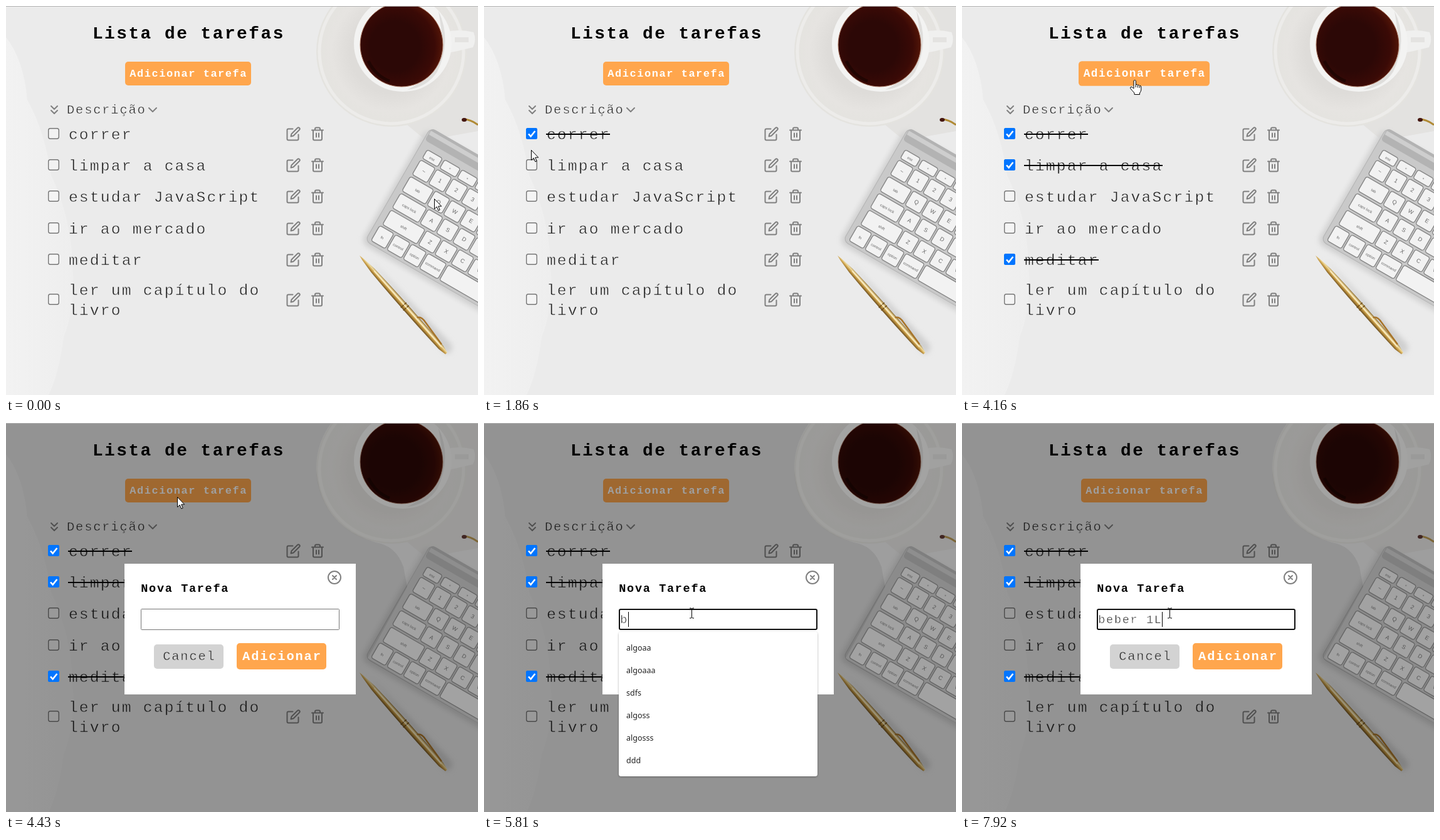
Recreate the animation shown at these times as an HTML page. Size 753x622 px, loop 8000 ms.

```html
<!DOCTYPE html>
<html lang="pt-BR">
<head>
<meta charset="utf-8">
<title>Lista de tarefas</title>
<style>
html, body { margin: 0; width: 100%; height: 100%; overflow: hidden; background: #ebebeb; }
svg { display: block; }
text { font-family: "Courier New", "Liberation Mono", monospace; letter-spacing: .09em; fill: #000; }
.bold { font-weight: 700; }
.title { font-size: 27.8px; }
.item { font-size: 24.6px; }
.mid { font-size: 20.4px; }
.field { font-size: 18.55px; }
.button { font-size: 17px; }
.white { fill: #fff; }
/* an outline in the paper colour makes the strokes finer */
.thin { fill: #1c1c1c; stroke: #ebebeb; stroke-width: .55; }
.icon { fill: none; stroke: #808080; stroke-width: 2; stroke-linecap: round; stroke-linejoin: round; }
.key { fill: #f2f2f2; stroke: #868686; stroke-width: 1.4; }
.label { font: 9px "Liberation Sans", sans-serif; letter-spacing: 0; fill: #666; text-anchor: middle; }
.small { font-size: 6px; }
.hint { font: 12.5px "Noto Sans", sans-serif; letter-spacing: 0; fill: #222; }
.arrow { fill: #fff; stroke: #000; stroke-width: 1; stroke-linejoin: round; }
</style>
</head>
<body>
<svg width="753" height="622" viewBox="0 0 753 622">
  <defs>
    <linearGradient id="table" x2="1"><stop offset="0" stop-color="#f2f2f2"/><stop offset="1" stop-color="#eeeeee"/></linearGradient>
    <radialGradient id="saucer"><stop offset=".55" stop-color="#dedcd9"/><stop offset=".8" stop-color="#e6e4e1"/><stop offset="1" stop-color="#e4e3df"/></radialGradient>
    <radialGradient id="coffee" cx=".42" cy=".52" r=".6"><stop offset=".5" stop-color="#2c0806"/><stop offset=".8" stop-color="#3a0a06"/><stop offset="1" stop-color="#571708"/></radialGradient>
    <linearGradient id="gold" x2="0" y2="1"><stop offset="0" stop-color="#86642a"/><stop offset=".3" stop-color="#f3e0a4"/><stop offset=".6" stop-color="#c79b45"/><stop offset="1" stop-color="#65481a"/></linearGradient>
    <filter id="soft" x="-20%" y="-20%" width="140%" height="140%"><feGaussianBlur stdDeviation="4"/></filter>
    <filter id="drop" x="-10%" y="-10%" width="120%" height="120%"><feDropShadow dx="0" dy="1" stdDeviation="1.5" flood-opacity=".35"/></filter>
  </defs>

  <g id="photo">
    <rect width="753" height="622" fill="#ebebeb"/>
    <path d="M0 50Q28 85 34 150Q62 200 72 270Q104 340 106 410Q112 480 92 530Q84 590 68 622H0Z" fill="url(#table)"/>
    <path d="M690 0H753V200L670 215L640 190Z" fill="#e3e2e0"/>
    <circle cx="615" cy="73" r="120" fill="url(#saucer)"/>
    <circle cx="615" cy="73" r="115" fill="none" stroke="#edecea" stroke-width="5"/>
    <path d="M700 42Q722 36 746 42Q751 54 745 66Q722 72 700 76Z" fill="#f0f0ef"/>
    <path d="M716 50H738V58H716Z" fill="#e4e3e1"/>
    <ellipse cx="633" cy="60" rx="78" ry="77" fill="#f3f3f2"/>
    <path d="M690 8Q712 55 688 105Q672 130 640 134Q690 110 698 60Z" fill="#dfdedc"/>
    <ellipse cx="631" cy="62" rx="66" ry="67" fill="url(#coffee)" stroke="#a87560" stroke-width="1"/>
    <path d="M578 88Q590 112 612 120" fill="none" stroke="#170403" stroke-width="5" opacity=".6"/>
    <path d="M729 181Q741 181 753 190" fill="none" stroke="#b08a35" stroke-width="3"/>
    <ellipse cx="731" cy="182" rx="4" ry="3" fill="#431510"/>
    <g id="keyboard" transform="translate(680 196) rotate(30)"></g>
    <path d="M580 405L710 540Q716 552 702 557Z" fill="#cfcfcf" filter="url(#soft)"/>
    <g transform="translate(564 399) rotate(48.5)">
      <path d="M0 0L8 -1.5L32 -4Q105 -6.5 196 -4.5L209 -2V2L196 4.5Q105 6.5 32 4L8 1.5Z" fill="url(#gold)"/>
      <path d="M106 -6V6M112 -6V6" stroke="#6f4f1a" stroke-width="1.5"/>
      <path d="M135 -3Q138 -10 150 -8L193 -4" fill="none" stroke="#a87428" stroke-width="2.5"/>
      <path d="M34 -1L196 -1" stroke="#fff6d8" stroke-width="1.5" opacity=".8"/>
    </g>
  </g>

  <text class="bold title" x="137.9" y="52">Lista de tarefas</text>
  <g id="add">
    <rect x="190" y="89" width="201" height="38" rx="5" fill="#ffa64d"/>
    <text class="bold white button" x="291.2" y="112.5" text-anchor="middle">Adicionar tarefa</text>
  </g>
  <path class="icon" transform="translate(65 154)" d="M7 13l5 5l5-5M7 6l5 5l5-5"/>
  <text class="mid thin" x="97" y="171.5">Descrição</text>
  <path class="icon" transform="translate(222 154)" d="M6 9l6 6l6-6"/>
  <g id="list"></g>

  <g id="dim">
    <rect y="1" width="753" height="621" fill="#000" opacity=".375"/>
    <path fill="#fffdf8" opacity=".1" fill-rule="evenodd" d="M518 1Q494 35 495 75Q502 165 590 191Q622 196 634 230L640 262L577 376L753 480V1ZM565 62A66 67 0 0 0 697 62A66 67 0 0 0 565 62Z"/>
  </g>
  <g id="marks"></g>

  <g id="modal">
    <rect x="189" y="225" width="369" height="209" fill="#fff"/>
    <text class="bold field" x="215.3" y="269.5">Nova Tarefa</text>
    <g class="icon" transform="translate(512 235)"><circle cx="12" cy="12" r="10"/><path d="M15 9l-6 6M9 9l6 6"/></g>
    <rect id="input" fill="#fff"/>
    <text id="typed" class="field thin" x="217.3" y="319.5" style="stroke: #fff"></text>
    <path id="caret" d="M0 302V326" stroke="#000"/>
    <rect x="236" y="354" width="111" height="39" rx="5" fill="#d3d3d3"/>
    <text class="mid thin" x="292.4" y="378.5" text-anchor="middle" style="stroke: #d3d3d3">Cancel</text>
    <rect x="368" y="352" width="143" height="42" rx="5" fill="#ffa64d"/>
    <text class="mid bold white" x="440.4" y="378.5" text-anchor="middle">Adicionar</text>
    <g id="hints"><rect x="215" y="334" width="317" height="231" rx="4" fill="#fff" filter="url(#drop)"/></g>
  </g>

  <rect width="753" height="1" fill="#b4b4b4"/>
  <g id="cursor">
    <path id="arrow" class="arrow" d="M.5 .5V16.5L4.2 13L6.8 19L9.2 18L6.7 12.2H11.7Z"/>
    <path id="hand" class="arrow" d="M0 1.5Q2 -.5 3.3 1.5V8Q5 6.5 6.5 8.5Q8.3 7.5 9.3 9.5Q11.5 9 11.8 11V16Q11.5 19 9.5 21V23.5H1V21Q-2 18 -5.5 13.5Q-6 11 -3 11.5L0 14ZM3.3 8V12M6.5 9V12.5M9.3 10V13"/>
    <path id="beam" fill="none" stroke="#000" d="M-3 -8H-1L.5 -7L2 -8H4M.5 -7V7M-3 8H-1L.5 7L2 8H4"/>
  </g>
</svg>
<script>
const LOOP = 8000;
const $ = id => document.getElementById(id);
const show = (id, on) => { $(id).style.display = on ? '' : 'none'; };

// Keyboard rows: centre y, key height, leading keys [x, width, label], then square keys from x
const rows = [
  [41, 16, [[10, 28, 'esc']], 42, '◦◦◦', 32],
  [66, 27, [[9, 27, '~']], 39, '1234', 30],
  [97, 27, [[8, 43, 'tab']], 54, 'QWER', 30],
  [128, 27, [[8, 48, 'caps lock']], 59, 'ASDF', 30],
  [159, 27, [[8, 63, 'shift']], 74, 'ZXCVB', 30],
  [190, 28, [[5, 26, 'fn'], [34, 27, 'control'], [64, 27, 'option'], [94, 34, 'command'], [131, 150, '']], 0, '', 30]
];
const key = (x, y, w, h, label) =>
  `<rect class="key" x="${x}" y="${y - h / 2}" width="${w}" height="${h}" rx="3.5"/>` +
  `<text class="label ${label.length > 1 ? 'small' : ''}" x="${x + w / 2}" y="${y + 3}">${label}</text>`;
$('keyboard').innerHTML =
  '<rect x="-8" y="4" width="320" height="211" rx="12" fill="#cfcfcf" filter="url(#soft)"/>' +
  '<rect x="-3" width="323" height="209" rx="9" fill="#c9c9c9" stroke="#b3b3b3"/>' +
  '<rect x="-1" width="321" height="22" rx="5" fill="#b3b3b3"/><rect y="4" width="320" height="7" fill="#cecece"/>' +
  rows.map(([y, h, lead, x, labels, pitch]) =>
    lead.map(([kx, w, s]) => key(kx, y, w, h, s)).join('') +
    [...labels].map((s, i) => key(x + i * pitch, y, pitch - 3, h, s)).join('')).join('');

// Tasks: checkbox centre y, lines, time of the tick
const tasks = [
  [204, ['correr'], 1730],
  [254, ['limpar a casa'], 2380],
  [304, ['estudar JavaScript']],
  [355, ['ir ao mercado']],
  [405, ['meditar'], 3290],
  [469, ['ler um capítulo do', 'livro']]
];
const edit = 'M11 4H4a2 2 0 0 0-2 2v14a2 2 0 0 0 2 2h14a2 2 0 0 0 2-2v-7M18.5 2.5a2.121 2.121 0 0 1 3 3L12 15l-4 1 1-4 9.5-9.5z';
const trash = 'M3 6h18M19 6v14a2 2 0 0 1-2 2H7a2 2 0 0 1-2-2V6m3 0V4a2 2 0 0 1 2-2h4a2 2 0 0 1 2 2v2M10 11v6M14 11v6';
const icon = (d, x, y) => `<path class="icon" transform="translate(${x} ${y})" d="${d}"/>`;

$('list').innerHTML = tasks.map(([y, lines], i) =>
  `<rect x="67.7" y="${y - 8.3}" width="16.6" height="16.6" rx="3" fill="#fff" fill-opacity=".35" stroke="#767676" stroke-width="1.4"/>` +
  lines.map((s, n) => `<text class="item thin" x="99.9" y="${y + 8.5 + (lines.length > 1 ? n * 32 - 16 : 0)}">${s}</text>`).join('') +
  icon(edit, 446.5, y - 11.5) + icon(trash, 485, y - 11.5) +
  `<rect id="strike${i}" x="99" y="${y}" width="${lines[0].length * 17}" height="2" fill="#000"/>`).join('');

$('marks').innerHTML = tasks.map(([y], i) =>
  `<g id="mark${i}"><rect x="67" y="${y - 9}" width="18" height="18" rx="2.5" fill="#0075ff"/>` +
  `<path d="M71 ${y + .5}l3.6 4l6.8-8.5" fill="none" stroke="#fff" stroke-width="2.6"/></g>`).join('');

$('hints').innerHTML += ['algoaa', 'algoaaa', 'sdfs', 'algoss', 'algosss', 'ddd']
  .map((s, i) => `<text class="hint" x="227" y="${364 + i * 36}">${s}</text>`).join('');

// Pointer: time, x, y, shape (arrow when omitted)
const moves = [
  [0, 683, 308], [120, 674, 311], [490, 655, 316], [610, 590, 308], [730, 480, 285],
  [850, 350, 255], [980, 225, 232], [1100, 140, 218], [1220, 110, 212, 'beam'],
  [1340, 88, 200], [1470, 78, 200], [1590, 75, 201], [1860, 75, 230], [1990, 76, 253],
  [2130, 76, 254], [2510, 67, 277], [2650, 59, 335], [2770, 62, 390], [3020, 64, 398],
  [3140, 66, 401], [3420, 75, 394], [3560, 105, 352], [3680, 155, 285], [3800, 205, 215],
  [3920, 245, 160], [4040, 266, 129, 'hand'], [4160, 274, 118, 'hand'], [4430, 273, 118],
  [4550, 278, 145], [4680, 292, 200], [4800, 312, 260], [4920, 328, 300, 'beam'], [5040, 331, 304, 'beam']
];
const typing = [5810, 6120, 6400, 6530, 6660, 7160, 7550, 7920];
const phrase = 'beber 1L';

function draw(now) {
  const t = now % LOOP;
  const [, x, y, shape = 'arrow'] = moves.filter(m => m[0] <= t).pop();
  $('cursor').setAttribute('transform', `translate(${x} ${y})`);
  for (const s of ['arrow', 'hand', 'beam']) show(s, s === shape);

  tasks.forEach(([, , at = Infinity], i) => {
    show('mark' + i, t >= at);
    show('strike' + i, t >= at);
  });

  const grow = t < 4040 || t >= 4430 ? 1 : t < 4160 ? 1.02 : 1.04;
  $('add').setAttribute('transform', `translate(290.5 108) scale(${grow}) translate(-290.5 -108)`);

  show('dim', t >= 4430);
  show('modal', t >= 4430);
  show('hints', t >= 5180 && t < 5980);

  const focus = t >= 5040, edge = focus ? 2 : 1;
  const box = { x: 215 + edge / 2, y: 297 + edge / 2, width: 317 - edge, height: 34 - edge,
    rx: edge, stroke: focus ? '#101010' : '#767676', 'stroke-width': edge };
  for (const k in box) $('input').setAttribute(k, box[k]);

  const count = typing.filter(at => at <= t).length;
  $('typed').textContent = phrase.slice(0, count);
  $('caret').setAttribute('transform', `translate(${Math.round(216.7 + count * 12.8) + .5} 0)`);
  show('caret', focus && (t < 5560 || count > 0));
}
function tick() {
  draw(performance.now());
  requestAnimationFrame(tick);
}
tick();
</script>
</body>
</html>
```
